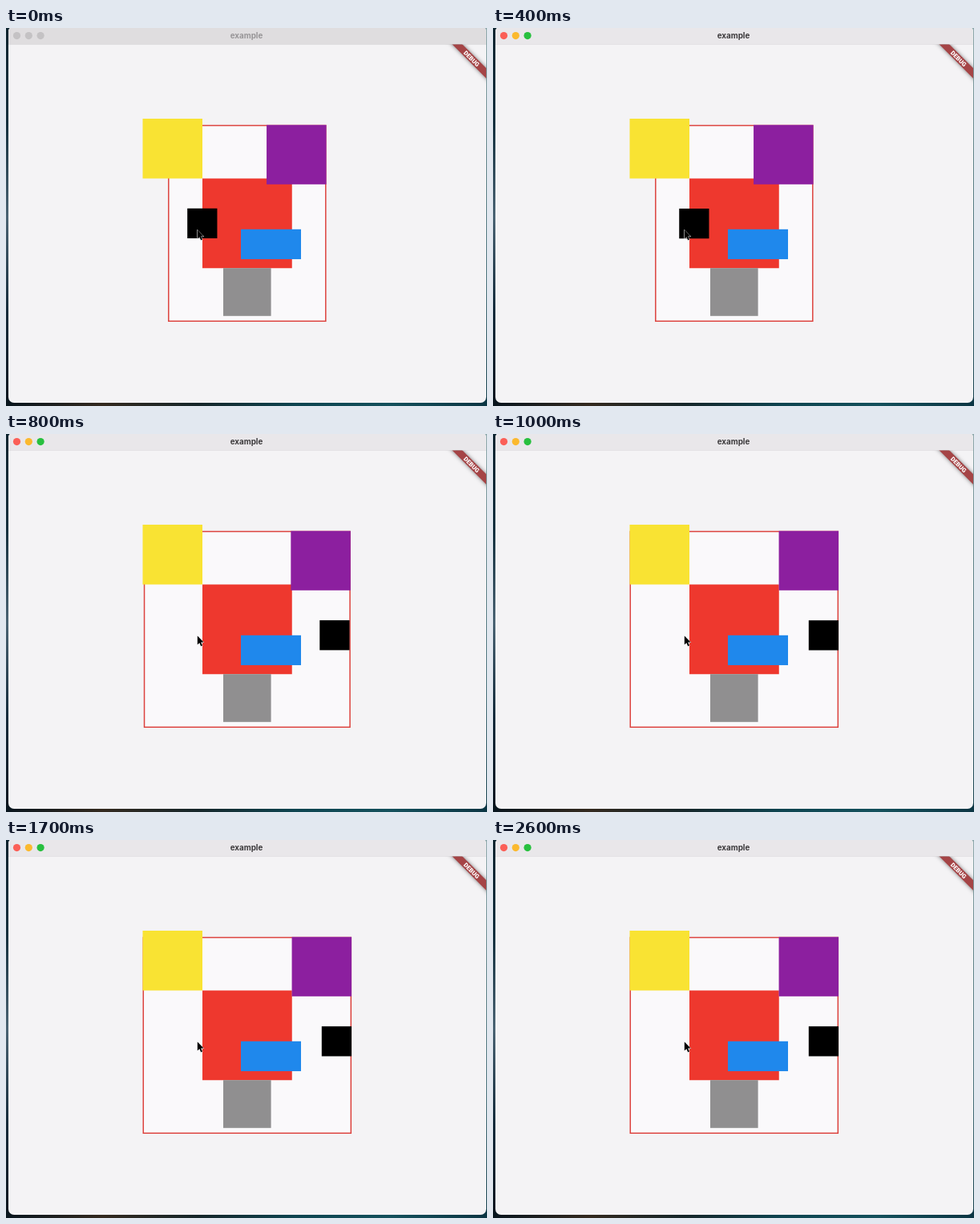
An HTML page with a canvas for the animation above (2800 ms loop, 600 by 471 pixels).

```html
<!DOCTYPE html>
<html lang="en">
<head>
<meta charset="utf-8">
<title>example</title>
<style>
html, body { margin: 0; width: 100%; height: 100%; overflow: hidden; }
canvas { display: block; }
</style>
</head>
<body>
<canvas id="stage" width="600" height="471"></canvas>
<script>
const ctx = document.getElementById('stage').getContext('2d');
const LOOP = 2800, TICK = 100, FOCUS_AT = 300, MOVE_AT = 400;
const EASE = [0.036, 0.38, 0.7, 0.905, 0.985, 0.998, 1];
const UNIT = 74.5, LEFT = 170.5, CENTER = 300.8;

function rect(color, x, y, w, h) {
  ctx.fillStyle = color;
  ctx.fillRect(x, y, w, h);
}

function gradient(x, y, ...colors) {
  const g = ctx.createLinearGradient(0, 0, x, y);
  colors.forEach((c, i) => g.addColorStop(i / (colors.length - 1), c));
  return g;
}

function label(text, font, color, x, y) {
  ctx.font = font;
  ctx.fillStyle = color;
  ctx.textAlign = 'center';
  ctx.textBaseline = 'alphabetic';
  ctx.fillText(text, x, y);
}

function drawDesktop() {
  rect(gradient(0, 471, '#0d2530', '#14303e', '#4b6474', '#142b3b', '#08151e'), 0, 0, 300, 471);
  rect(gradient(0, 471, '#8fa9ac', '#5f8288', '#47707a', '#123e4b'), 300, 0, 300, 471);
  rect(gradient(600, 0, '#08151e', '#33291f', '#16262a', '#0d4450', '#14505c', '#0b3543'), 0, 460, 600, 11);
}

function drawTitleBar(active) {
  rect(active ? '#e9e7ea' : '#dfdddf', 3, 0, 596, 20);
  rect(active ? '#dad8da' : '#d3d1d3', 3, 20, 596, 0.6);
  ['#fb5f57', '#fbb92e', '#28c03f'].forEach((color, i) => {
    ctx.fillStyle = active ? color : '#c4c2c4';
    ctx.beginPath();
    ctx.arc(13.5 + 14.8 * i, 9.6, 4.6, 0, 7);
    ctx.fill();
  });
  label('example', '700 9.8px Inter, sans-serif', active ? '#3c3a3c' : '#979597', 300, 13);
}

function drawBanner() {
  ctx.save();
  ctx.beginPath();
  ctx.rect(540, 20.5, 59, 60);
  ctx.clip();
  ctx.translate(580.8, 38.2);
  ctx.rotate(Math.PI / 4);
  ctx.shadowColor = 'rgba(0,0,0,.5)';
  ctx.shadowBlur = 5;
  rect('#a54446', -50, -4.5, 100, 9);
  ctx.shadowColor = 'transparent';
  label('DEBUG', '900 7.6px Roboto, sans-serif', '#fff', 0, 2.7);
  ctx.restore();
}

function drawShapes(progress) {
  const x = 226.2 + 167.6 * progress, y = 224.8 + 7.4 * progress;
  // The outline is as wide as the span of the children, centred in the window.
  const width = Math.max(x + UNIT / 2, 368) - LEFT;
  const left = CENTER - width / 2, right = left + width;
  rect('#faf9fb', left, 121, width, 245);
  ctx.strokeStyle = '#dc423d';
  ctx.lineWidth = 1.5;
  ctx.strokeRect(left + 0.75, 121.5, width - 1.5, 243.8);
  rect('#ee382e', 245, 187.5, 1.5 * UNIT, 1.5 * UNIT);
  rect('#f9e333', LEFT, 113, UNIT, UNIT);
  rect('#8c1f9f', right - UNIT, 120.8, UNIT, 74);
  rect('#908f90', 271, 299.2, 0.8 * UNIT, 0.8 * UNIT);
  rect('#1f88ec', 293, 250.8, 75, UNIT / 2);
  rect('#000', x, y, UNIT / 2, UNIT / 2);
}

function drawCursor() {
  ctx.save();
  ctx.translate(238.8, 251.6);
  const arrow = new Path2D('M0 0V11L2.6 8.7L4.4 12.8L6.2 12L4.4 8H7.8Z');
  ctx.fillStyle = '#000';
  ctx.strokeStyle = '#fff';
  ctx.lineWidth = 1;
  ctx.lineJoin = 'round';
  ctx.stroke(arrow);
  ctx.fill(arrow);
  ctx.restore();
}

function draw(time) {
  const step = Math.floor((time - MOVE_AT) / TICK);
  const progress = step < 0 ? 0 : EASE[Math.min(step, EASE.length - 1)];
  drawDesktop();
  ctx.save();
  ctx.beginPath();
  ctx.roundRect(3, -1, 596, 468, [5, 5, 7, 7]);
  ctx.clip();
  rect('#f4f3f5', 0, 0, 600, 471);
  drawTitleBar(time >= FOCUS_AT);
  drawShapes(progress);
  drawBanner();
  ctx.restore();
  drawCursor();
}

const start = performance.now();
function frame() {
  draw((performance.now() - start) % LOOP);
  requestAnimationFrame(frame);
}
frame();
</script>
</body>
</html>
```
